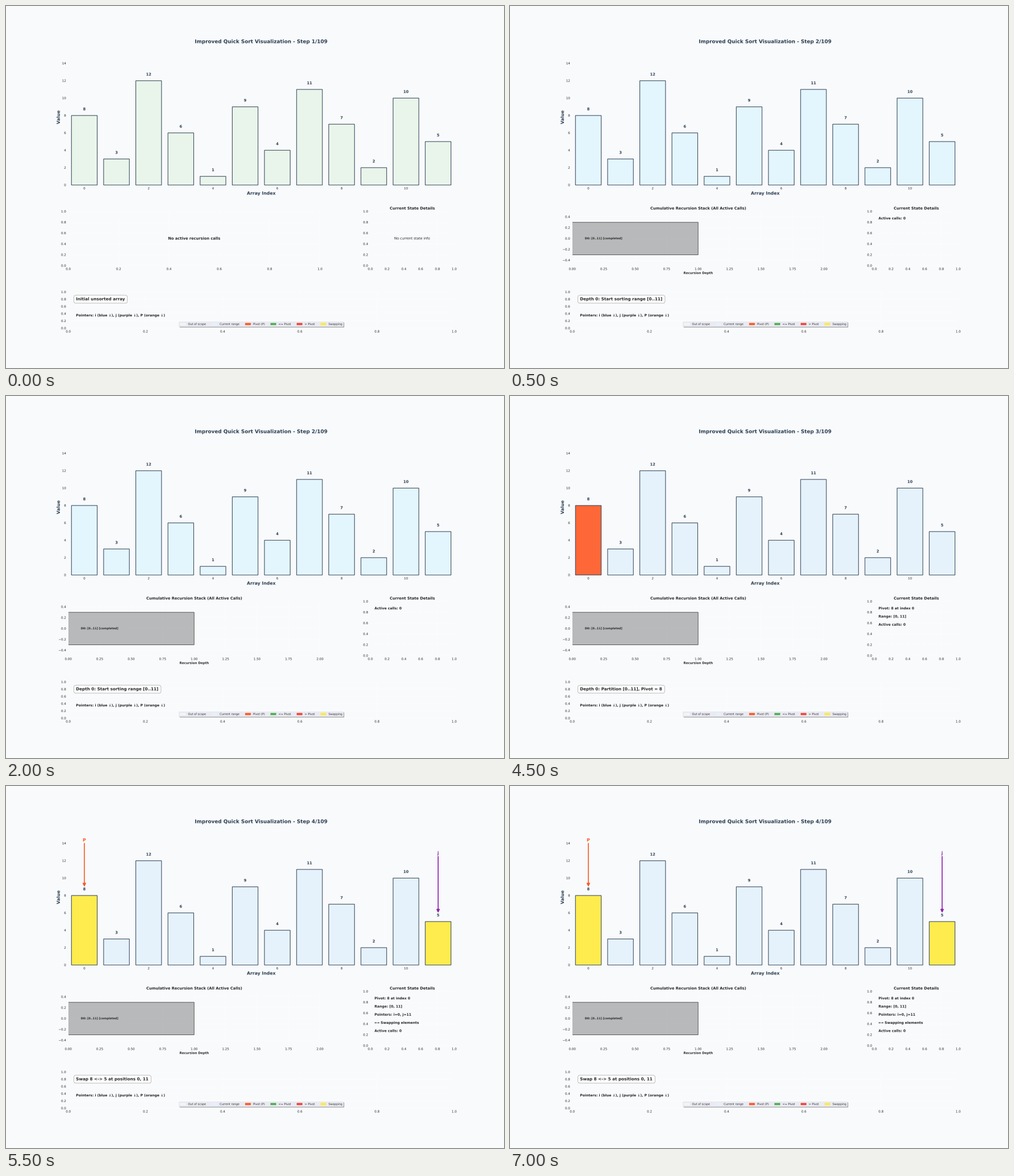
A matplotlib script that plays this animation: 877x638 px, repeating every 8 s.

```python
import matplotlib.pyplot as plt
from matplotlib.animation import FuncAnimation
from matplotlib.patches import Patch
from matplotlib.patheffects import Normal

DPI = 39.875
BACK, NAVY, INK = "#F8FAFC", "#2C3E50", "0.15"
IDLE, CALL, RANGE = "#E8F5E9", "#E1F5FE", "#E3F2FD"
PIVOT, SWAP, PURPLE = "#FF5722", "#FFEB3B", "#8E24AA"

plt.rcParams.update({
    "font.family": "DejaVu Sans", "font.size": 10, "text.color": INK,
    "text.hinting": "none",
    "path.snap": False,
    "path.effects": [Normal()],  # text as outlines, placed between pixels
    "figure.facecolor": BACK, "axes.facecolor": BACK,
    "axes.linewidth": 0, "axes.edgecolor": "white", "axes.labelcolor": INK,
    "axes.axisbelow": True, "axes.grid": True,
    "grid.color": "white", "grid.linewidth": 1,
    "xtick.color": INK, "ytick.color": INK,
    "xtick.major.size": 0, "ytick.major.size": 0,
    "xtick.major.pad": 7, "ytick.major.pad": 7,
    "patch.linewidth": 0.3,
})

VALUES = [8, 3, 12, 6, 1, 9, 4, 11, 7, 2, 10, 5]
TOTAL = 109

# marks: bar index -> colour
# pointers: (name, bar index, tail height above the bar, colour)
STEPS = [
    dict(note="Initial unsorted array", fill=IDLE, info=None),
    dict(note="Depth 0: Start sorting range [0..11]", fill=CALL,
         info=["Active calls: 0"]),
    dict(note="Depth 0: Partition [0..11], Pivot = 8", fill=RANGE,
         marks={0: PIVOT},
         info=["Pivot: 8 at index 0", "Range: [0, 11]", "Active calls: 0"]),
    dict(note="Swap 8 <-> 5 at positions 0, 11", fill=RANGE,
         marks={0: SWAP, 11: SWAP},
         pointers=[("P", 0, 6, PIVOT), ("j", 11, 7.5, PURPLE)],
         info=["Pivot: 8 at index 0", "Range: [0, 11]", "Pointers: i=0, j=11",
               "\u27f7 Swapping elements", "Active calls: 0"]),
]

TICK = 500
HOLDS = [1, 5, 5, 5]  # ticks each step stays
TIMELINE = [step for step, hold in enumerate(HOLDS) for _ in range(hold)]

LEGEND = [
    ("Out of scope", "#F5F5F5"), ("Current range", RANGE),
    ("Pivot (P)", PIVOT), ("<= Pivot", "#4CAF50"),
    ("> Pivot", "#F44336"), ("Swapping", SWAP),
]

fig = plt.figure(figsize=(877 / DPI, 638 / DPI), dpi=DPI)
grid = fig.add_gridspec(3, 2, height_ratios=[3, 1.2, 0.8],
                        width_ratios=[3, 1], hspace=0.35, wspace=0.3)
bars_ax = fig.add_subplot(grid[0, :])
stack_ax = fig.add_subplot(grid[1, 0])
state_ax = fig.add_subplot(grid[1, 1])
note_ax = fig.add_subplot(grid[2, :])


def bold(ax, x, y, text, size, **kw):
    ax.text(x, y, text, fontsize=size, fontweight="bold", **kw)


def draw_bars(number, step):
    ax = bars_ax
    marks = step.get("marks", {})
    colors = [marks.get(i, step["fill"]) for i in range(len(VALUES))]
    ax.grid(False)
    ax.bar(range(len(VALUES)), VALUES, width=0.8, color=colors,
           edgecolor=NAVY, linewidth=2, alpha=0.9)
    for i, value in enumerate(VALUES):
        bold(ax, i, value + 0.5, str(value), 12, color=NAVY,
             ha="center", va="bottom")
    for name, i, rise, color in step.get("pointers", []):
        tail = VALUES[i] + rise
        ax.annotate("", xy=(i, VALUES[i] + 1), xytext=(i, tail),
                    arrowprops=dict(arrowstyle="-|>", color=color, lw=3,
                                    mutation_scale=20, shrinkA=0, shrinkB=0))
        bold(ax, i, tail + 0.1, name, 14, color=color,
             ha="center", va="bottom")
    ax.set_xlim(-0.5, len(VALUES) - 0.5)
    ax.set_ylim(0, max(VALUES) * 1.3)
    style = dict(fontweight="bold", color=NAVY)
    ax.set_title(f"Improved Quick Sort Visualization - Step {number}/{TOTAL}",
                 fontsize=16, pad=20, **style)
    ax.set_xlabel("Array Index", fontsize=14, **style)
    ax.set_ylabel("Value", fontsize=14, **style)


def draw_stack(active):
    ax = stack_ax
    if not active:
        bold(ax, 0.5, 0.5, "No active recursion calls", 12,
             ha="center", va="center")
        return
    ax.barh(0, 1, height=0.6, color="#9E9E9E", edgecolor="black",
            linewidth=1.5, alpha=0.7)
    bold(ax, 0.1, 0, "D0: [0..11] [completed]", 9, va="center")
    ax.set_xlim(0, 2)
    ax.set_ylim(-0.5, 0.5)
    ax.set_title("Cumulative Recursion Stack (All Active Calls)",
                 fontsize=12, fontweight="bold")
    ax.set_xlabel("Recursion Depth", fontsize=10, fontweight="bold")


def draw_state(info):
    ax = state_ax
    ax.set_title("Current State Details", fontsize=12, fontweight="bold")
    if info is None:
        ax.text(0.5, 0.5, "No current state info", fontsize=11,
                ha="center", va="center")
        return
    for row, line in enumerate(info):
        bold(ax, 0.05, 0.9 - 0.15 * row, line, 11, va="top")


def draw_note(note):
    ax = note_ax
    bold(ax, 0.02, 0.8, note, 13, va="center",
         bbox=dict(boxstyle="round,pad=0.5", facecolor="white",
                   edgecolor="gray", linewidth=1, alpha=0.9))
    bold(ax, 0.02, 0.35,
         "Pointers: i (blue \u2193), j (purple \u2193), P (orange \u2193)",
         11, va="center")
    ax.legend(handles=[Patch(color=c, label=name) for name, c in LEGEND],
              loc="lower center", ncol=len(LEGEND), fontsize=9,
              frameon=True, shadow=True, facecolor="#EAEAF2")


def update(frame):
    index = TIMELINE[frame]
    step = STEPS[index]
    for ax in fig.axes:
        ax.clear()
    draw_bars(index + 1, step)
    draw_stack(step["info"] is not None)
    draw_state(step["info"])
    draw_note(step["note"])
    return []


anim = FuncAnimation(fig, update, frames=len(TIMELINE), interval=TICK,
                     repeat=True, blit=False)
plt.show()
```
